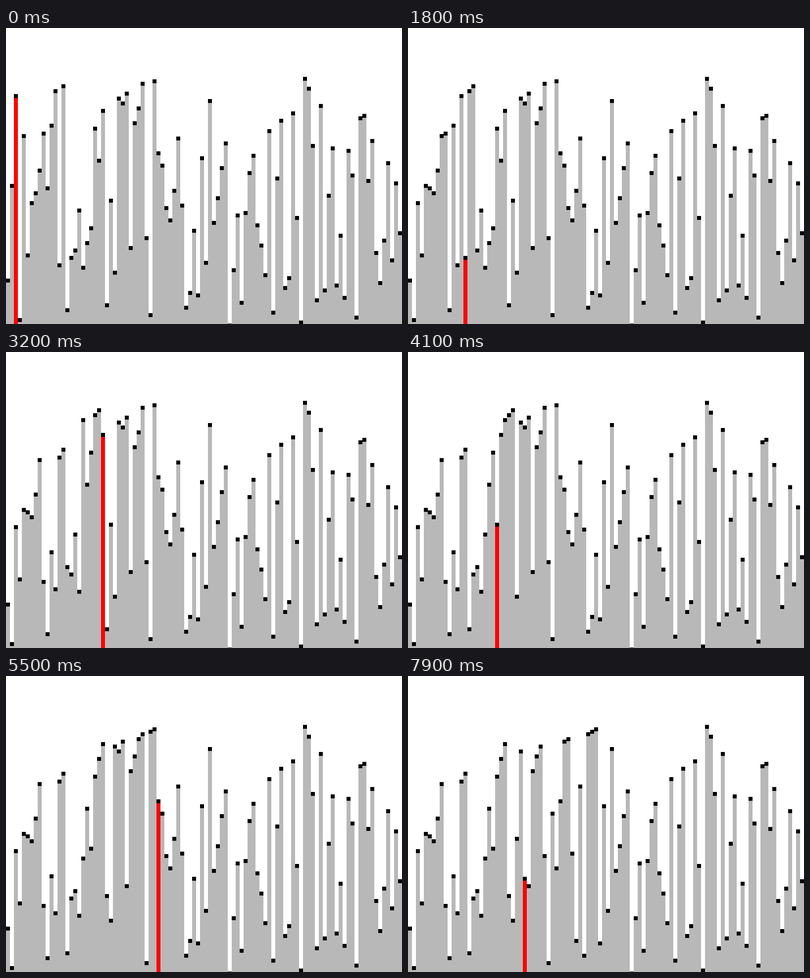
A matplotlib script that plays this animation: 800 px wide and 600 px high, repeating every 8 s.

```python
from itertools import islice

import matplotlib.pyplot as plt
from matplotlib.animation import FuncAnimation

W, H, CELL, TOP, SPAN = 800, 600, 8, 99, 500
FRAMES, INTERVAL = 80, 100
GREY, RED = "#b8b8b8", "#ff0000"

VALUES = [
    18, 56, 92, 2, 76, 28, 49, 53, 62, 77, 55, 80, 94, 24, 96, 6, 27, 30, 46, 23,
    33, 39, 79, 66, 86, 8, 50, 21, 91, 89, 93, 31, 81, 87, 97, 35, 4, 98, 69, 64,
    47, 42, 54, 75, 48, 7, 13, 38, 12, 67, 25, 90, 41, 51, 63, 73, 0, 22, 44, 9,
    45, 61, 68, 40, 32, 20, 78, 5, 59, 82, 15, 19, 85, 43, 1, 99, 95, 72, 10, 88,
    14, 52, 71, 16, 36, 11, 70, 60, 3, 83, 84, 58, 74, 29, 17, 34, 65, 26, 57, 37,
]

LEO = [1, 1]
while LEO[-1] < len(VALUES):
    LEO.append(LEO[-1] + LEO[-2] + 1)


def children(root, order):
    """(index, order) of both subtrees of a Leonardo heap."""
    if order < 2:
        return []
    return [(root - 1 - LEO[order - 2], order - 1), (root - 1, order - 2)]


def grow(orders):
    if len(orders) > 1 and orders[-2] == orders[-1] + 1:
        orders.pop()
        orders[-1] += 1
    else:
        orders.append(0 if orders and orders[-1] == 1 else 1)


def smoothsort_heapify(a):
    """Build the heaps, yielding (values, active index) at every sift step."""
    orders = []
    for i in range(len(a)):
        grow(orders)
        root, k = i, len(orders) - 1
        # Move left along the heap roots.
        while k > 0:
            left = root - LEO[orders[k]]
            rivals = [root] + [c for c, _ in children(root, orders[k])]
            if a[left] < max(a[r] for r in rivals):
                break
            a[left], a[root] = a[root], a[left]
            root, k = left, k - 1
        # Sift down inside the heap.
        order = orders[k]
        while order > 1:
            yield a[:], root
            child, child_order = max(children(root, order), key=lambda c: a[c[0]])
            if a[child] < a[root]:
                break
            a[child], a[root] = a[root], a[child]
            root, order = child, child_order


steps = list(islice(smoothsort_heapify(VALUES[:]), FRAMES))

fig = plt.figure(figsize=(W / 100, H / 100), dpi=100, facecolor="white")
ax = fig.add_axes([0, 0, 1, 1])
ax.set(xlim=(0, W), ylim=(H, 0))
ax.axis("off")

xs = [i * CELL for i in range(len(VALUES))]
style = dict(width=CELL, align="edge", linewidth=0, antialiased=False)
bars = ax.bar(xs, 0, color=GREY, **style)
caps = ax.bar(xs, CELL, color="black", **style)
ax.set(xlim=(0, W), ylim=(H, 0))


def draw(n):
    values, active = steps[n]
    for i, (v, bar, cap) in enumerate(zip(values, bars, caps)):
        top = TOP + (len(values) - 1 - v) * SPAN // (len(values) - 1)
        cap.set_y(top)
        bar.set_y(top)
        bar.set_height(max(H - top, 0))
        bar.set_facecolor(RED if i == active else GREY)
    return [*bars, *caps]


anim = FuncAnimation(fig, draw, frames=FRAMES, interval=INTERVAL,
                     repeat=True, repeat_delay=0, blit=False)
plt.show()
```
